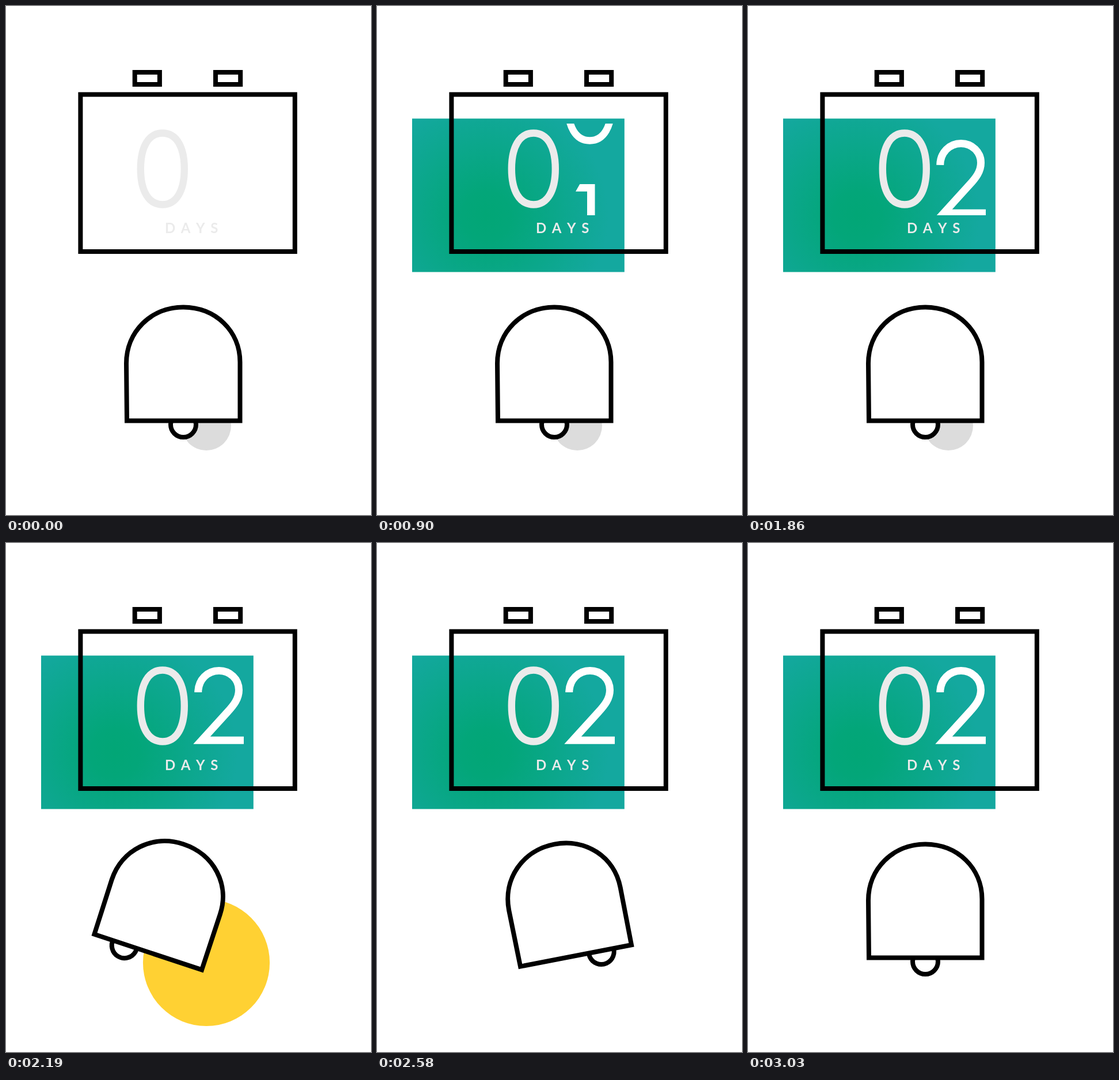
These frames come from a looping animation (634 px wide and 883 px high, 3.3 s). An HTML page:

```html
<!DOCTYPE html>
<html lang="en">
<head>
<meta charset="utf-8">
<title>Days reminder</title>
<style>
  html, body { margin: 0; width: 100%; height: 100%; overflow: hidden; background: #fff; }
  svg { display: block; width: 634px; height: 883px; }
  .line { fill: none; stroke: #000; stroke-width: 8; }
  .solid { fill: #fff; }
  .zero { fill: none; stroke-width: 12.4; }
  .label { font: bold 24px Lato, "Open Sans", sans-serif; letter-spacing: 9.6px; font-kerning: none; fill: #ebebeb; }
</style>
</head>
<body>
<svg viewBox="0 0 634 883">
  <defs>
    <radialGradient id="teal" gradientUnits="userSpaceOnUse" cx="190" cy="365" r="212">
      <stop offset="0" stop-color="#02a676"/>
      <stop offset="0.2" stop-color="#03a679"/>
      <stop offset="1" stop-color="#14a89f"/>
    </radialGradient>
    <clipPath id="window"><rect x="320" y="204" width="100" height="159"/></clipPath>
    <path id="zero" class="zero" d="M0-62C25-62 38-37 38 0S25 62 0 62-38 37-38 0-25-62 0-62Z"/>
  </defs>

  <rect id="card" x="61" y="195.3" width="368.8" height="266.2" fill="url(#teal)"/>
  <use href="#zero" x="271.8" y="282.5" stroke="#ebebeb"/>
  <g clip-path="url(#window)">
    <g id="reel">
      <use href="#zero" x="369.5" y="282.5" stroke="#fff"/>
      <path class="solid" transform="translate(0 200)" d="M352.3 220H378.5V348.5H365V232.8H345Z"/>
      <path transform="translate(0 400)" fill="none" stroke="#fff" stroke-width="13"
        d="M333.7 259C334 237 350 221.5 370 221.5C389 221.5 404.5 236 404.5 255C404.5 270 396 281 384 294L340 342.3H413"/>
    </g>
  </g>
  <text class="label" x="276" y="394">DAYS</text>

  <g class="line">
    <rect x="129.4" y="153.5" width="372.4" height="272.5"/>
    <rect x="223.7" y="115" width="43.2" height="21"/>
    <rect x="364" y="115" width="43.2" height="21"/>
  </g>

  <circle id="ripple" cx="348" cy="728"/>
  <circle id="clapper" class="line" style="fill:#fff" cx="308" cy="726" r="22"/>
  <path id="bell" class="line" style="fill:#fff"
    d="M210 719.5L209 620C209 565 252 522.5 308 522.5C364 522.5 406.5 564 406.5 618V719.5Z"/>
</svg>

<script>
const LOOP = 3300, STEP = 30, PITCH = 200;
const byId = id => document.getElementById(id);
const [card, reel, ripple, clapper, bell] =
  ["card", "reel", "ripple", "clapper", "bell"].map(byId);

const progress = (t, start, end) => Math.min(1, Math.max(0, (t - start) / (end - start)));
const mix = (a, b, u) => a + (b - a) * u;
const slow = u => 0.45 * u + 0.55 * (1 - (1 - u) ** 2);
const smooth = u => (1 - Math.cos(Math.PI * u)) / 2;

// Keys are [time, angle] pairs joined by smooth swings.
const bellKeys = [[2040, 0], [2220, 19.6], [2515, -14.1], [2815, 14.1], [3000, 0]];
const clapperKeys = [[2040, 0], [2220, 32.5], [2550, -25], [2835, 20], [2985, -0.8], [3030, 0]];

function swing(keys, t) {
  let angle = keys[0][1];
  for (let i = 1; i < keys.length; i++) {
    const [start, from] = keys[i - 1], [end, to] = keys[i];
    if (t >= start) angle = mix(from, to, smooth(progress(t, start, end)));
  }
  return angle;
}

function rotate(node, angle) {
  node.setAttribute("transform", `rotate(${angle} 308.3 523.5)`);
}

function draw(t) {
  const slide = mix(-430, 0, slow(progress(t, 60, 420)));
  card.setAttribute("transform", `translate(${slide} 0)`);

  const digit = slow(progress(t, 660, 1230)) + slow(progress(t, 1380, 1950));
  reel.setAttribute("transform", `translate(0 ${-PITCH * digit})`);

  const grow = 1 - (1 - progress(t, 2040, 2340)) ** 1.4;
  const tint = progress(t, 2040, 2130);
  const rgb = [[220, 255], [220, 209], [220, 51]].map(([a, b]) => Math.round(mix(a, b, tint)));
  ripple.setAttribute("r", mix(43, 151, grow));
  ripple.setAttribute("fill", `rgb(${rgb})`);
  ripple.setAttribute("opacity", 1 - progress(t, 2220, 2460));

  rotate(bell, swing(bellKeys, t));
  rotate(clapper, swing(clapperKeys, t));
}

const origin = performance.now();
function tick() {
  const t = (performance.now() - origin) % LOOP;
  draw(Math.floor(t / STEP) * STEP);
  requestAnimationFrame(tick);
}
tick();
</script>
</body>
</html>
```
